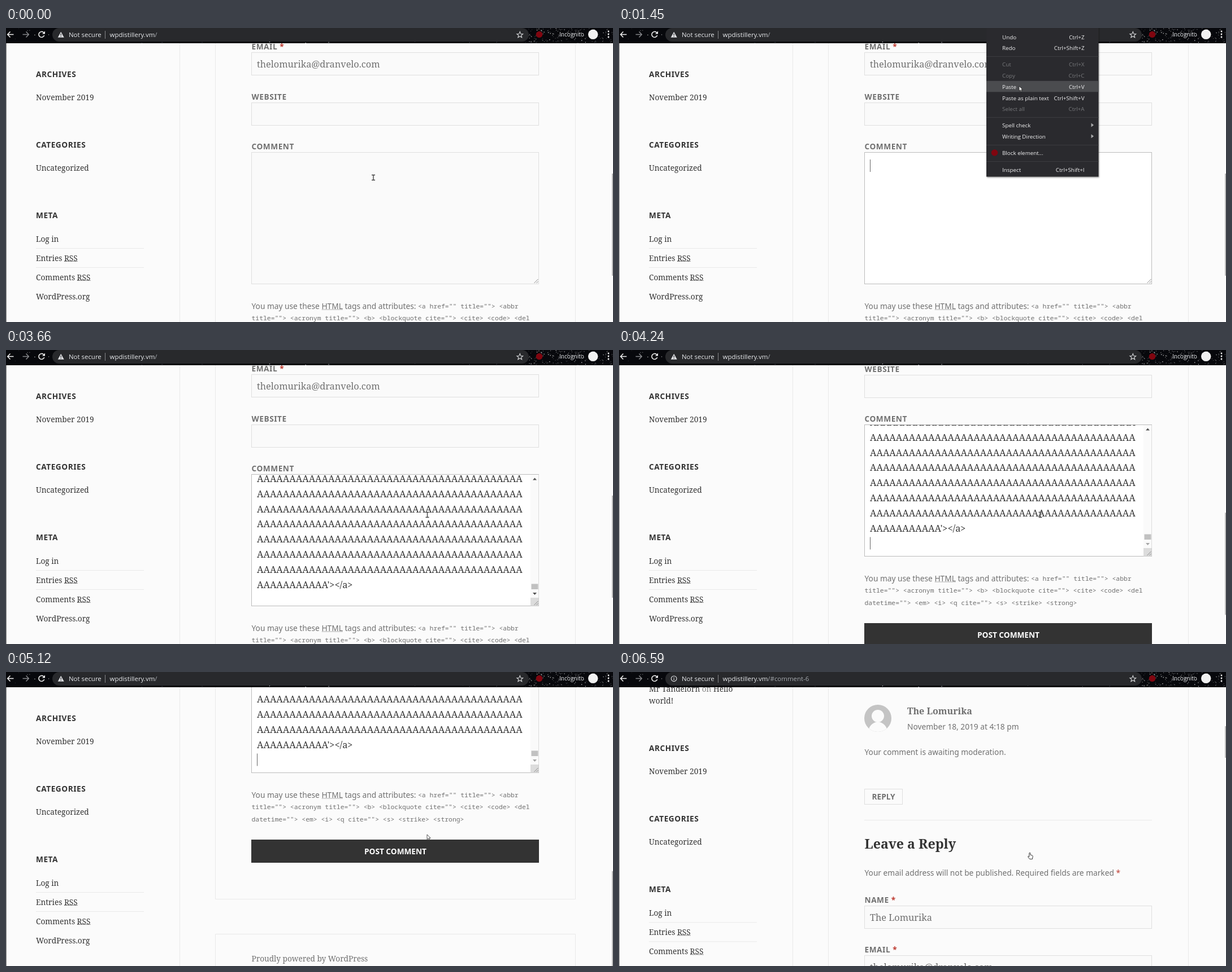
Recreate the animation shown at these times as an HTML page. Size 1074 by 521 pixels, loop 8000 ms.

```html
<!DOCTYPE html>
<html lang="en">
<head>
<meta charset="utf-8">
<title>Comment form</title>
<style>
html, body { margin: 0; width: 100%; height: 100%; overflow: hidden; background: #fbfbfb; }
svg { display: block; width: 100%; height: 100%; }
text { white-space: pre; }
.serif { font: 13.65px "Noto Serif", serif; fill: #333; }
.sans { font: 13.73px "Noto Sans", sans-serif; fill: #707070; }
.mono { font: 11.4px "Noto Sans Mono", monospace; fill: #707070; }
.head { font: 700 13.65px "Noto Sans", sans-serif; letter-spacing: .04em; fill: #333; }
.label { font: 700 13.65px "Noto Sans", sans-serif; letter-spacing: .04em; fill: #707070; }
.btn { font: 700 13.65px "Noto Sans", sans-serif; }
.field { font: 16.25px "Noto Serif", serif; fill: #707070; }
.bar { font: 11.45px "Open Sans", "Noto Sans", sans-serif; fill: #e8eaed; }
.menu { font: 9.82px "Open Sans", "Noto Sans", sans-serif; fill: #f1f1f2; }
.off { fill: #77787b; }
</style>
</head>
<body>
<svg id="stage" viewBox="0 0 1074 521">
  <defs>
    <clipPath id="areaClip"><rect x="435" y="221" width="493" height="232"/></clipPath>
    <clipPath id="faceClip"><circle cx="458" cy="-377" r="24"/></clipPath>
    <filter id="shadow" x="-10%" y="-10%" width="120%" height="120%">
      <feDropShadow dx="1" dy="1.5" stdDeviation="1.2" flood-opacity=".4"/>
    </filter>
  </defs>
</svg>
<script>
const NS = 'http://www.w3.org/2000/svg';
const stage = document.getElementById('stage');

function el(parent, tag, attrs = {}) {
  const node = document.createElementNS(NS, tag);
  for (const key in attrs) node.setAttribute(key, attrs[key]);
  parent.appendChild(node);
  return node;
}
const group = (parent, attrs) => el(parent, 'g', attrs);
const rect = (p, x, y, width, height, fill, more) => el(p, 'rect', { x, y, width, height, fill, ...more });
const box = (p, x, y, w, h, fill, stroke) => rect(p, x + .5, y + .5, w - 1, h - 1, fill, { stroke });
const path = (p, d, attrs) => el(p, 'path', { d, fill: 'none', ...attrs });
const circle = (p, cx, cy, r, fill, more) => el(p, 'circle', { cx, cy, r, fill, ...more });

// Each part is a string or a [string, colour] pair.
function text(p, cls, x, y, parts, more) {
  const node = el(p, 'text', { class: cls, x, y, ...more });
  for (const part of [].concat(parts)) {
    const [str, fill] = Array.isArray(part) ? part : [part];
    const span = el(node, 'tspan');
    span.textContent = str;
    if (fill) span.style.fill = fill;
  }
  return node;
}
const dots = (p, x1, x2, y, stroke) =>
  path(p, `M${x1} ${y}H${x2}`, { stroke, 'stroke-dasharray': '1.2 1' });
const show = (node, on) => { node.style.display = on ? '' : 'none'; };

const RED = '#bd3a30', LINE = '#e9e9e9', EDGE = '#dfdfdf', FIELD = '#fafafa';
const EMAIL = 'thelomurika@dranvelo.com', AUTHOR = 'The Lomurika';

// Fixed page frame
rect(stage, 0, 0, 1074, 521, '#fbfbfb');
rect(stage, 307, 27, 1, 494, LINE);

// Sidebar
const side = group(stage);
text(side, 'serif', 53, -18, ['Mr Tandelorn', [' on ', '#808080'], 'Hello']);
text(side, 'serif', 53, 2.5, 'world!');
[['ARCHIVES', 82], ['CATEGORIES', 207], ['META', 332]].forEach(([s, y]) => text(side, 'head', 53, y + 5, s));
[['November 2019', 123], ['Uncategorized', 248], ['Log in', 373.5], ['Entries RSS', 407.5],
 ['Comments RSS', 441.5], ['WordPress.org', 475.5]].forEach(([s, y]) => text(side, 'serif', 53, y + 5, s));
rect(side, 53, 390, 191, 1, LINE);
rect(side, 53, 424, 191, 1, LINE);
dots(side, 103, 127, 413.5, '#333');
dots(side, 126, 150, 447.5, '#333');

// Scrolling column
const page = group(stage);
path(page, 'M370.5 -600V677.5H1007.5V-600M370.5 900V739.5H1007.5V900', { stroke: LINE });

const face = group(page, { 'clip-path': 'url(#faceClip)' });
rect(face, 434, -401, 48, 48, '#c4c4c4');
circle(face, 458, -381, 11, '#fbfbfb');
el(face, 'ellipse', { cx: 458, cy: -352, rx: 17, ry: 18.5, fill: '#fbfbfb' });
text(page, 'label', 510, -384, AUTHOR, { style: 'font:700 16px "Noto Serif",serif;letter-spacing:0' });
text(page, 'sans', 510, -357, 'November 18, 2019 at 4:18 pm');
text(page, 'sans', 434.5, -312, 'Your comment is awaiting moderation.');
box(page, 434, -252, 68, 28, 'none', EDGE);
text(page, 'btn', 447.5, -233, 'REPLY', { fill: '#707070' });
rect(page, 434, -197, 509, 1, LINE);
text(page, 'serif', 434.5, -146.5, 'Leave a Reply', { style: 'font-weight:700;font-size:23.2px' });
text(page, 'sans', 434.5, -98, ['Your email address will not be published. Required fields are marked ', ['*', RED]]);

[['NAME', true, AUTHOR], ['EMAIL', true, EMAIL], ['WEBSITE', false, '']].forEach(([name, must, value], i) => {
  const y = 43 + (i - 1) * 88.5;
  text(page, 'label', 434.5, y - 5, must ? [name + ' ', ['*', RED]] : name);
  box(page, 434, Math.round(y), 509, 41, FIELD, EDGE);
  text(page, 'field', 444, y + 27, value);
});

text(page, 'label', 434.5, 215, 'COMMENT');
const area = box(page, 434, 220, 509, 234, FIELD, EDGE);
const inner = group(page, { 'clip-path': 'url(#areaClip)' });
const pasted = group(inner);
for (let i = 1; i < 10; i++) text(pasted, 'field', 444, 421.5 - i * 26.8, 'A'.repeat(41), { style: 'fill:#333' });
text(pasted, 'field', 444, 421.5, 'A'.repeat(11) + "'></a>", { style: 'fill:#333' });
const caret = rect(inner, 444, 0, 1, 22, '#666');
const bars = group(page);
rect(bars, 928, 221, 14.5, 218, '#fafafa');
rect(bars, 929.5, 414.5, 12, 9.5, '#c1c1c1');
rect(bars, 928, 439, 14.5, 14.5, '#dcdcdc');
path(bars, 'M932 230.5L935.5 226.5L939 230.5Z', { fill: '#505050' });
const down = path(bars, 'M932 430L935.5 434L939 430Z', { fill: '#505050' });
path(page, 'M934.5 452L941.5 445M938.5 452L941.5 449', { stroke: '#8a8a8a' });

text(page, 'sans', 434.5, 497.5, 'You may use these HTML tags and attributes: ');
dots(page, 559, 596, 499, '#707070');
text(page, 'mono', 729, 497, '<a href="" title=""> <abbr');
text(page, 'mono', 434.5, 518, 'title=""> <acronym title=""> <b> <blockquote cite=""> <cite> <code> <del');
text(page, 'mono', 434.5, 539.5, 'datetime=""> <em> <i> <q cite=""> <s> <strike> <strong>');
const post = rect(page, 434, 572, 509, 41, '#333');
text(page, 'btn', 689, 598, 'POST COMMENT', { fill: '#fff', 'text-anchor': 'middle' });
text(page, 'serif', 434.5, 788, 'Proudly powered by WordPress', { style: 'fill:#707070' });

rect(stage, 0, 27, 1, 494, '#858585');
const thumb = rect(stage, 1072, 258, 2, 181, '#b9b9b9');

// Browser bar, with stars densest at the right
rect(stage, 0, 0, 1074, 27, '#07080c');
let seed = 11;
const rnd = () => (seed = (seed * 16807) % 2147483647) / 2147483647;
for (let i = 0; i < 330; i++) {
  const size = .5 + rnd() * .9;
  const x = i % 2 ? 925 + rnd() * 149 : rnd() * 1074;
  rect(stage, x, rnd() * 26, size, size, '#fff', { opacity: .2 + rnd() * .6 });
}
rect(stage, 82, 0, 843, 24, '#28292c', { rx: 12 });
const stroke = (c, w = 1.5) => ({ stroke: c, 'stroke-width': w });
path(stage, 'M13.5 11.5H3M7.5 6.5L2.7 11.5L7.5 16.5', stroke('#f1f1f1'));
path(stage, 'M29.5 11.5H40M35.5 6.5L40.3 11.5L35.5 16.5', stroke('#85868a'));
const reload = group(stage);
path(reload, 'M66.6 8A5 5 0 1 0 67.7 13', stroke('#f1f1f1', 1.6));
path(reload, 'M69 5.5V10.5H64Z', { fill: '#f1f1f1' });
const stop = path(stage, 'M58.5 7L67.5 16M67.5 7L58.5 16', stroke('#f1f1f1', 1.6));
const warn = group(stage);
path(warn, 'M97.2 6.8L102.7 16.8H91.7Z', { fill: '#dfe0e3' });
path(warn, 'M97.2 10V13.3M97.2 14.3V15.6', stroke('#28292c', 1.2));
const info = group(stage);
circle(info, 97.2, 11.8, 4.8, 'none', stroke('#dfe0e3', 1.2));
path(info, 'M97.2 11.3V14.6M97.2 9V10.3', stroke('#dfe0e3', 1.2));
text(stage, 'bar', 111, 16, 'Not secure');
rect(stage, 175, 5, 1, 14, '#85868a');
const urls = ['/', '/#comment-6'].map(s => text(stage, 'bar', 183.5, 16, ['wpdistillery.vm', [s, '#a5a9ae']]));
const star = [...Array(10).keys()].map(i => {
  const a = Math.PI * (i / 5 - .5), r = i % 2 ? 2.5 : 5.7;
  return (909.3 + r * Math.cos(a)).toFixed(1) + ' ' + (12.2 + r * Math.sin(a)).toFixed(1);
});
path(stage, 'M' + star.join('L') + 'Z', stroke('#d5d6d8', 1.1));
circle(stage, 943.5, 11.5, 5.8, '#800610');
text(stage, 'bar', 979, 15, 'Incognito', { style: 'font-size:10.1px' });
circle(stage, 1038.7, 11.3, 8.7, '#f1f1f1');
[6, 11, 16].forEach(y => circle(stage, 1066, y, 1.4, '#f1f1f1'));

// Context menu
const menu = group(stage);
rect(menu, 650, -4, 198.5, 267.5, '#292a2d', { filter: 'url(#shadow)' });
const hover = rect(menu, 650, 0, 198.5, 19.5, '#4b4c4f');
[50, 158, 207, 236].forEach(y => rect(menu, 650, y, 198.5, 1, '#3b3c3f'));
[['Undo', 'Ctrl+Z', 16], ['Redo', 'Ctrl+Shift+Z', 35.5], ['Cut', 'Ctrl+X', 64.5, 1], ['Copy', 'Ctrl+C', 84.5, 1],
 ['Paste', 'Ctrl+V', 104], ['Paste as plain text', 'Ctrl+Shift+V', 124], ['Select all', 'Ctrl+A', 143.5, 1],
 ['Spell check', '', 172.5], ['Writing Direction', '', 192.5], ['Block element...', '', 221.5],
 ['Inspect', 'Ctrl+Shift+I', 251]].forEach(([name, keys, y, dim]) => {
  const cls = dim ? 'menu off' : 'menu';
  text(menu, cls, 678, y + 3.6, name);
  text(menu, cls, 823.5, y + 3.6, keys, { 'text-anchor': 'end' });
});
[172, 191.7].forEach(y => path(menu, `M835.5 ${y - 3.5}L840 ${y}L835.5 ${y + 3.5}Z`, { fill: '#a9aaac' }));
circle(menu, 664.5, 221, 5.8, '#800610');

// Pointers, each drawn from its hot spot
const pointers = { beam: group(stage), arrow: group(stage), hand: group(stage) };
path(pointers.beam, 'M-3 -4.5H3M-3 4.5H3M0 -4.5V4.5', stroke('#444', 1.4));
path(pointers.arrow, 'M0 0V8.6L2 6.8L3.4 9.8L4.8 9.2L3.5 6.3H6.2Z', { fill: '#fff', stroke: '#111', 'stroke-width': .7 });
path(pointers.hand, 'M-1.2 6V.8Q-.2 -.6 .8 .8V4L4.2 5Q5.2 5.3 5.2 6.5L4.4 11.5H-.4L-3.6 7.2Q-3.4 5.6 -1.2 7.4Z',
  { fill: '#fff', stroke: '#222', 'stroke-width': .9 });

// Moments of change, in ms
const LOOP = 8000, FOCUS = 150, MENU = 710, PICK = 2800, PASTE = 2950, END = 3810,
  PRESS = 5550, SEND = 5980, LOADED = 6440;

// Steps: [start ms, value...]
const scrollSteps = [[0, 0], [3960, 44], [4110, 88], [4820, 195], [4970, 275], [LOADED, -459]];
const caretSteps = [[0, 0], [FOCUS, 1], [MENU, 0], [1150, 1], [1740, 0], [2190, 1], [PICK, 0],
  [PASTE, 1], [3540, 0], [3960, 1], [4540, 0], [4970, 1], [PRESS, 0]];
const hoverSteps = [[0, -99], [1150, 182.6], [1300, 93.8]];
const pointerSteps = [[0, 'beam', 650, 265], [MENU, 'arrow', 650, 264], [1150, 'arrow', 684, 188],
  [1300, 'arrow', 708, 103], [PASTE, 'arrow', 708, 94], [3250, 'beam', 709, 142], [3390, 'beam', 733, 246],
  [3540, 'beam', 745.5, 292], [4970, 'arrow', 745, 288], [5410, 'arrow', 741, 287], [PRESS, 'hand', 727, 320]];
const at = (steps, t) => steps.reduce((now, step) => step[0] <= t ? step : now).slice(1);

function draw(t) {
  const [scroll] = at(scrollSteps, t);
  const filled = t >= PASTE, ended = t >= END, posted = t >= LOADED;
  const focused = t >= FOCUS && t < SEND;
  page.setAttribute('transform', `translate(0 ${-scroll})`);
  side.setAttribute('transform', `translate(0 ${posted ? 53.3 : 0})`);
  thumb.setAttribute('y', posted ? 96 : 258 + scroll * .345);
  thumb.setAttribute('height', posted ? 56 : 181);

  area.setAttribute('fill', focused ? '#fff' : FIELD);
  area.setAttribute('stroke', focused ? '#bcbcbc' : EDGE);
  show(pasted, filled);
  show(bars, filled);
  pasted.setAttribute('transform', `translate(0 ${ended ? -12 : 0})`);
  down.setAttribute('fill', ended ? '#a3a3a3' : '#505050');
  show(caret, at(caretSteps, t)[0]);
  caret.setAttribute('y', !filled ? 233 : ended ? 419.5 : 431.5);
  post.setAttribute('fill', t >= PRESS && !posted ? '#707070' : '#333');

  const loading = t >= SEND && !posted;
  show(reload, !loading);
  show(stop, loading);
  show(warn, !posted);
  show(info, posted);
  urls.forEach((url, i) => show(url, i === +posted));

  show(menu, t >= MENU && t < PICK);
  hover.setAttribute('y', at(hoverSteps, t)[0]);

  const [kind, x, y] = at(pointerSteps, t);
  for (const name in pointers) show(pointers[name], name === kind);
  pointers[kind].setAttribute('transform', `translate(${x} ${y})`);
}

const start = performance.now();
function tick() {
  draw((performance.now() - start) % LOOP);
  requestAnimationFrame(tick);
}
tick();
</script>
</body>
</html>
```
